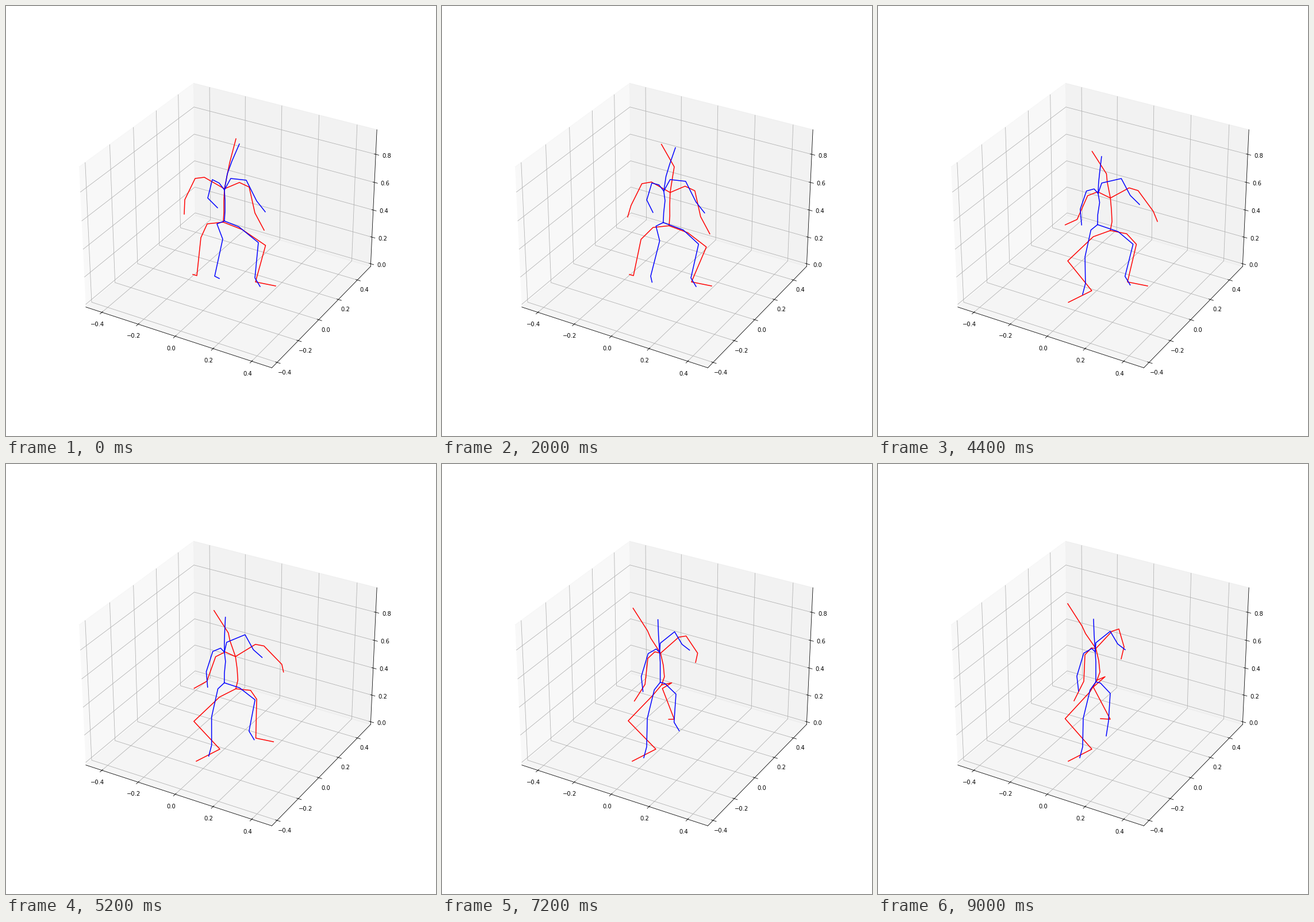
A matplotlib script for the animation above (9200 ms loop, 748 by 748 pixels).

```python
import numpy as np
import matplotlib.pyplot as plt
from matplotlib.animation import FuncAnimation
from matplotlib.lines import Line2D

SIZE, DPI = 748, 72
FRAMES, STEP_MS = 46, 200


def move(span, x0, y0, x1, y1, bow_x=0, bow_y=0):
    """Eased move from one vector to another within span, bowed on the way."""
    start, end, bow = np.array([[x0, y0], [x1, y1], [bow_x, bow_y]], float)

    def at(t):
        u = np.clip((t - span[0]) / (span[1] - span[0]), 0, 1)
        s = u * u * (3 - 2 * u)
        return start + (end - start) * s + bow * np.sin(np.pi * s)
    return at


def sway(*path):
    """Smooth polynomial drift of the pelvis near rows of time, x, y."""
    path = np.array(path, float)
    curve = np.polyfit(path[:, 0], path[:, 1:], 5)
    return lambda t: t ** np.arange(5, -1, -1) @ curve


def chain(span, *bones):
    """Bones joined end to end, each turning within the same span."""
    moves = [move(span, *bone) for bone in bones]
    return lambda t, root: root + np.cumsum([[0, 0]] + [m(t) for m in moves], axis=0)


def leg(hip, bend, ankle, toe):
    """Hip hangs on the pelvis, the ankle stands on the floor, the knee bends between."""
    def at(t, pelvis):
        h, a = pelvis + hip(t), ankle(t)
        return np.array([pelvis, h, (h + a) / 2 + bend(t), a, a + toe(t)])
    return at


class Body:
    def __init__(self, fig, color, pelvis, spine, head, legs, arms):
        self.pelvis, self.spine, self.head = pelvis, spine, head
        self.legs, self.arms = legs, arms
        self.lines = [
            fig.add_artist(Line2D([], [], color=color, lw=1.5,
                                  transform=fig.transFigure))
            for _ in range(5)]

    def pose(self, t):
        pelvis = self.pelvis(t)
        spine = self.spine(t, pelvis)
        chest = spine[3]
        chains = [np.vstack([spine, spine[-1] + self.head(t)])]
        chains += [limb(t, pelvis) for limb in self.legs]
        chains += [limb(t, chest) for limb in self.arms]
        for line, pts in zip(self.lines, chains):
            line.set_data(pts[:, 0] / SIZE, 1 - pts[:, 1] / SIZE)


fig = plt.figure(figsize=(SIZE / DPI, SIZE / DPI), dpi=DPI)
ax = fig.add_subplot(projection="3d")
HALF = 0.4962
for set_lim, mid in ((ax.set_xlim, 0.006), (ax.set_ylim, 0.0475),
                     (ax.set_zlim, 0.4764)):
    set_lim(mid - HALF, mid + HALF)

red = Body(
    fig, "red",
    pelvis=sway((0, 378, 376), (2, 395, 382), (3, 403, 387), (4.4, 404, 390),
                (6, 393, 390), (7.2, 382, 384), (9, 381, 376)),
    spine=chain((1, 8), (1, -17, 5, -14), (0, -20, -2, -20), (1, -21, -5, -21),
                (6, -30, -18, -26), (3, -15, -6, -13)),
    head=move((0, 2.4), 11, -42, -25, -39),
    legs=(
        leg(hip=move((2, 8.5), -28, 3, -12, 20, -8, 3),
            bend=move((1.6, 4.8), -2, -21, -45, -3, 0, -8),
            ankle=move((1.8, 4.6), 332, 469, 372, 496, 10, -8),
            toe=move((2, 4.6), -7, -2, -41, 21, -4, -8)),
        leg(hip=move((1, 9), 33, 13, 14, -6, 3, 0),
            bend=move((2.5, 8.5), 29, -18, -25, -19, 0, -8),
            ankle=move((4.8, 7.2), 434, 480, 404, 444, 12, -2),
            toe=move((4.6, 8), 35, 7, -17, -1)),
    ),
    arms=(
        chain((0.5, 8.5), (-35, -20, -8, -1), (-16, 2, -11, 12, -4, 0),
              (-18, 37, -2, 46, -8, 0), (-1, 25, -17, 34, -12, -20)),
        chain((2, 9), (26, -11, 28, -30, 8, -2), (17, 8, 12, -4),
              (10, 45, 9, 31, 22, -7), (16, 30, -5, 21, -4, -13)),
    ),
)

blue = Body(
    fig, "blue",
    pelvis=sway((0, 380, 374), (2, 384, 377), (3, 387, 378), (4.4, 380, 381),
                (6, 380, 380), (7.2, 379, 380), (9, 379, 379)),
    spine=chain((0, 7), (1, -17, 0, -17), (0, -19, 0, -18, 4, -4),
                (-1, -18, -1, -17, -2, 2), (5, -28, -1, -15),
                (8, -22, -1, -15)),
    head=move((0, 7), 13, -30, -1, -27),
    legs=(
        leg(hip=move((0, 9), -13, 5, -10, 14),
            bend=move((1.8, 3.2), 12, -19, -5.5, 0),
            ankle=move((2.4, 6), 363, 470, 356, 492, 2, 0),
            toe=move((0, 4.4), 8, 4, -5, 19)),
        leg(hip=move((0, 7.4), 25, 10, 8, 2, 24, 8),
            bend=move((4.4, 8), 20, -17, 10, -15),
            ankle=move((3.5, 8), 433, 473, 401, 447),
            toe=move((7.2, 9), 9, 15, -4, 26)),
    ),
    arms=(
        chain((0, 7), (-9, -12, -6, -6), (-12, -6, -14, 8),
              (-8, 32, -12, 40, 0, -7), (17, 17, 3, 26, -6, 5)),
        chain((2, 7), (11, -20, 1, -16), (27, 3, 25, -20, 8, 0),
              (18, 36, 13, 22), (15, 19, 13, 10, 2, 1)),
    ),
)


def draw(i):
    t = i * STEP_MS / 1000
    red.pose(t)
    blue.pose(t)
    return red.lines + blue.lines


anim = FuncAnimation(fig, draw, frames=FRAMES, interval=STEP_MS, repeat=True,
                     repeat_delay=0, blit=False)
plt.show()
```
